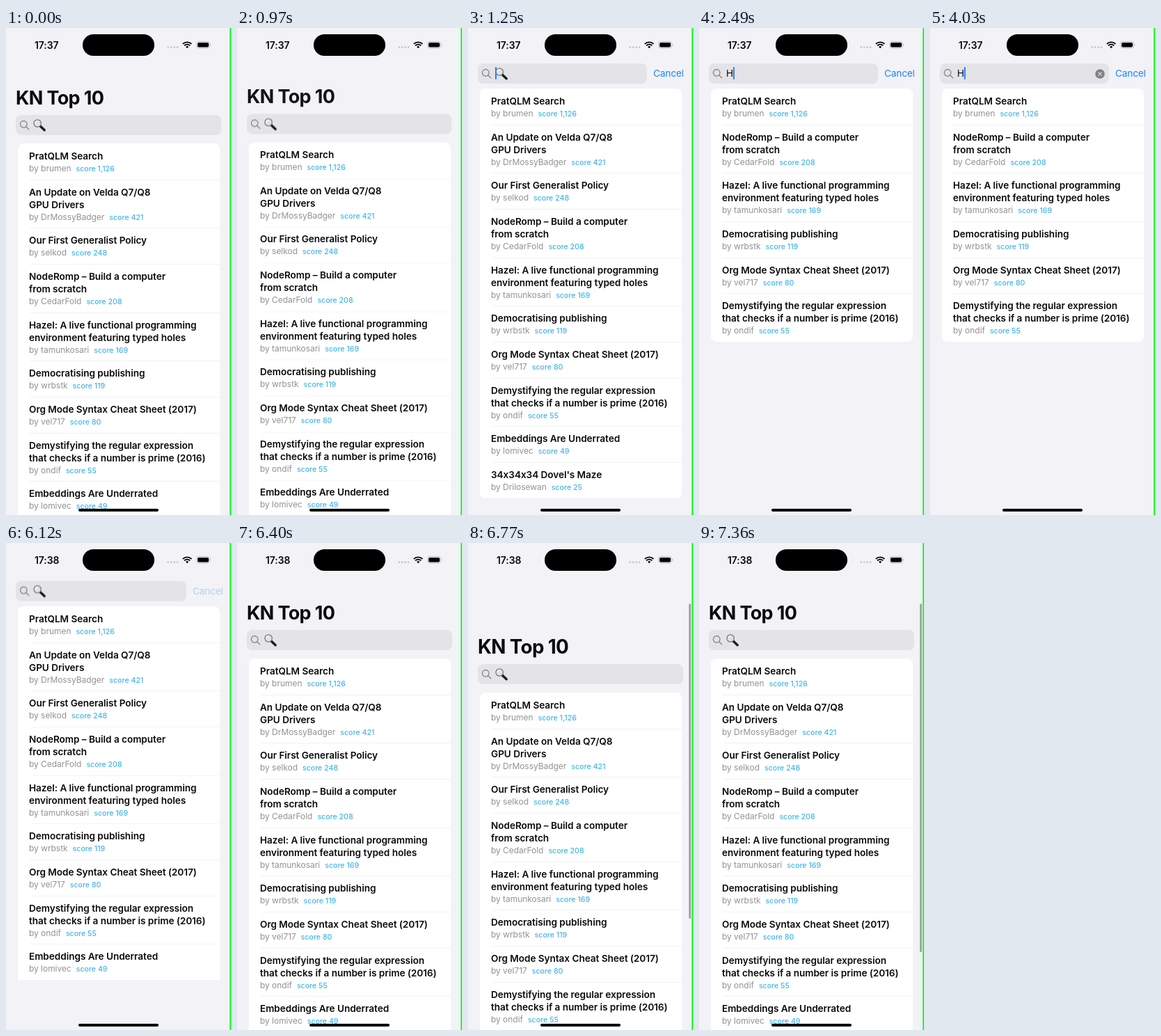
Write an HTML page that moves like this. It is 323 px wide and 700 px high and loops after 8 s.

```html
<!DOCTYPE html>
<html lang="en">
<head>
<meta charset="utf-8">
<title>Searchable list</title>
<style>
  html, body { margin: 0; width: 100%; height: 100%; overflow: hidden; }
  body {
    position: relative; background: #f2f2f7; color: #0b0b0c;
    font: 400 13.6px Inter, "Liberation Sans", sans-serif;
  }
  /* every animated part shares the same 8 s clock */
  .stage * { animation: 8s linear infinite; }
  .stage { position: absolute; left: 0; top: 0; width: 323px; height: 700px; overflow: hidden; }
  .stage svg, .abs { position: absolute; }

  .page { position: absolute; inset: 0; animation-name: pull; }

  h1 {
    position: absolute; left: 14px; top: 84px; margin: 0; white-space: nowrap;
    font-size: 27px; font-weight: 700; line-height: 34px; letter-spacing: -.65px;
    transform-origin: 0 50%;
  }
  .stage h1 { animation-name: title; }

  .search {
    position: absolute; left: 14px; top: 124.5px; width: 295px; height: 29px;
    border-radius: 8px; background: #e3e3e8; line-height: 29px;
  }
  .stage .search { animation-name: search; }
  .lens { left: 0; top: 0; }
  .hint { left: 24px; top: 4px; }
  .stage .hint { animation: hint 8s step-end infinite; }
  .input { position: absolute; left: 25px; top: 0; display: flex; align-items: center; height: 29px; }
  .stage .k1 { animation: k1 8s step-end infinite; }
  .stage .k2 { animation: k2 8s step-end infinite; }
  .caret { width: 1.8px; height: 18px; background: #2f80f7; border-radius: 1px; }
  .stage .caret { animation-name: caret; }
  .clear { right: 6px; top: 8px; }
  .stage .clear { animation: clear 8s step-end infinite; }
  .cancel {
    position: absolute; left: calc(100% + 9px); top: 0;
    color: #1a82ff; letter-spacing: -.15px;
  }
  .stage .cancel { animation-name: cancel; }

  .card {
    position: absolute; left: 16.5px; top: 166px; width: 290px; margin: 0; padding: 0;
    border-radius: 8px; background: #fff; overflow: hidden; list-style: none;
  }
  .stage .card { animation: card 8s linear infinite, crop 8s step-end infinite; }
  .card li { position: relative; overflow: hidden; }
  .card li + li::before {
    content: ""; position: absolute; left: 17px; right: 0; top: 0; height: 1px; background: #f2f2f4;
  }
  .stage .none { animation: hide1 8s step-end infinite; }
  .stage .one { animation: hide2 8s step-end infinite; }
  .card h2 {
    margin: 9px 0 0 16.5px; white-space: nowrap;
    font-size: 13.6px; font-weight: 600; line-height: 18.05px; letter-spacing: -.05px;
  }
  .card p {
    margin: 0 0 7.6px 16.5px; height: 17px; line-height: 17px; white-space: nowrap;
    font-size: 12px; letter-spacing: -.04px; color: #929296;
  }
  .card b { margin-left: 7px; font-size: 10.6px; font-weight: 500; letter-spacing: 0; color: #45b4ea; }

  .time {
    position: absolute; left: 41px; top: 14.5px; line-height: 20px;
    font-size: 14px; font-weight: 600; letter-spacing: -.1px;
  }
  .stage .t1 { animation: early 8s step-end infinite; }
  .stage .t2 { animation: late 8s step-end infinite; }
  .island { left: 110px; top: 9px; width: 102.5px; height: 31px; border-radius: 16px; background: #000; }
  .home { left: 104px; top: 691px; width: 114.5px; height: 4px; border-radius: 2px; background: #000; }
  .bar { left: 317px; top: 87px; width: 3px; height: 501px; border-radius: 2px; background: #a3a3a7; }
  .stage .bar { animation: bar 8s linear infinite, barOn 8s step-end infinite; }
  .edge { right: 0; top: 0; width: 2px; height: 100%; background: #1dff2a; }

  /* overscroll and spring back */
  @keyframes pull {
    0%, 82.6% { transform: none; animation-timing-function: ease-out; }
    84.6%, 85.8% { transform: translateY(49px); animation-timing-function: cubic-bezier(.35, 0, .3, 1); }
    92%, 100% { transform: none; }
  }
  @keyframes bar {
    0%, 82.6% { height: 501px; animation-timing-function: ease-out; }
    84.6%, 85.8% { height: 453px; animation-timing-function: cubic-bezier(.35, 0, .3, 1); }
    92%, 100% { height: 501px; }
  }
  @keyframes barOn { 0% { opacity: 0; } 82.875%, 100% { opacity: 1; } }

  /* search focus and dismissal */
  @keyframes title {
    0%, 11.75% { transform: none; opacity: 1; animation-timing-function: ease-in-out; }
    14.6% { transform: translateY(-62px); opacity: 0; }
    77% { transform: translateY(-50px); opacity: 0; animation-timing-function: ease-out; }
    80%, 82.6% { transform: none; opacity: 1; animation-timing-function: ease-out; }
    84.6%, 85.8% { transform: scale(1.03); animation-timing-function: cubic-bezier(.35, 0, .3, 1); }
    92%, 100% { transform: none; opacity: 1; }
  }
  @keyframes search {
    0%, 11.75% { transform: none; width: 295px; animation-timing-function: ease-in-out; }
    15.6%, 75.875% { transform: translateY(-74px); width: 243px; animation-timing-function: ease-in-out; }
    80%, 100% { transform: none; width: 295px; }
  }
  @keyframes card {
    0%, 11.75% { transform: none; animation-timing-function: ease-in-out; }
    15.6%, 75.875% { transform: translateY(-79px); animation-timing-function: ease-in-out; }
    80%, 100% { transform: none; }
  }
  @keyframes crop {
    0% { clip-path: none; }
    75.875%, 100% { clip-path: inset(0 0 51.65px 0); }
  }
  @keyframes cancel {
    0%, 12.5% { opacity: 0; }
    15.6%, 73.4% { opacity: 1; }
    73.5%, 76.8% { opacity: .3; }
    78.2%, 100% { opacity: 0; }
  }

  /* typing "He", then deleting it */
  @keyframes hint { 0% { opacity: 1; } 31.125% { opacity: 0; } 52.875%, 100% { opacity: 1; } }
  @keyframes k1 { 0% { font-size: 0; } 31.125% { font-size: 13.6px; } 52.875%, 100% { font-size: 0; } }
  @keyframes k2 { 0% { font-size: 0; } 32.75% { font-size: 13.6px; } 50.375%, 100% { font-size: 0; } }
  @keyframes clear { 0% { opacity: 0; } 32.75% { opacity: 1; } 53.75%, 100% { opacity: 0; } }
  @keyframes hide1 { 0% { max-height: 80px; } 31.125% { max-height: 0; } 52.875%, 100% { max-height: 80px; } }
  @keyframes hide2 { 0% { max-height: 80px; } 32.75% { max-height: 0; } 50.375%, 100% { max-height: 80px; } }
  @keyframes caret {
    0%, 14% { opacity: 0; }
    15.4%, 20.6% { opacity: 1; }
    21.5%, 24.3% { opacity: 0; }
    26.1%, 39.8% { opacity: 1; }
    40.75%, 44.4% { opacity: 0; }
    45.375%, 61.6% { opacity: 1; }
    63.375%, 66.7% { opacity: 0; }
    67.6%, 73.4% { opacity: 1; }
    73.5%, 100% { opacity: 0; }
  }

  @keyframes early { 0% { opacity: 1; } 62.5%, 100% { opacity: 0; } }
  @keyframes late { 0% { opacity: 0; } 62.5%, 100% { opacity: 1; } }
</style>
</head>
<body>
<div class="stage">
  <div class="page">
    <h1>KN Top 10</h1>

    <ul class="card">
      <li class="one"><h2>PratQLM Search</h2><p>by brumen<b>score 1,126</b></p></li>
      <li class="none"><h2>An Update on Velda Q7/Q8<br>GPU Drivers</h2><p>by DrMossyBadger<b>score 421</b></p></li>
      <li class="none"><h2>Our First Generalist Policy</h2><p>by selkod<b>score 248</b></p></li>
      <li class="one"><h2>NodeRomp – Build a computer<br>from scratch</h2><p>by CedarFold<b>score 208</b></p></li>
      <li class="one"><h2>Hazel: A live functional programming<br>environment featuring typed holes</h2><p>by tamunkosari<b>score 169</b></p></li>
      <li class="one"><h2>Democratising publishing</h2><p>by wrbstk<b>score 119</b></p></li>
      <li><h2>Org Mode Syntax Cheat Sheet (2017)</h2><p>by vel717<b>score 80</b></p></li>
      <li><h2>Demystifying the regular expression<br>that checks if a number is prime (2016)</h2><p>by ondif<b>score 55</b></p></li>
      <li class="none"><h2>Embeddings Are Underrated</h2><p>by lomivec<b>score 49</b></p></li>
      <li class="none"><h2>34x34x34 Dovel's Maze</h2><p>by Drilosewan<b>score 25</b></p></li>
    </ul>

    <div class="search">
      <svg class="lens" width="24" height="29" fill="none" stroke="#85858a" stroke-width="1.3" stroke-linecap="round">
        <circle cx="11.3" cy="13.3" r="4.8"/><path d="M15 17l3.8 3.8"/>
      </svg>
      <svg class="hint" width="22" height="22">
        <path d="M11.2 12l6 5.8" stroke="#1c1c1e" stroke-width="3.4" stroke-linecap="round"/>
        <circle cx="7.2" cy="8" r="5.2" fill="#dfe3e6" stroke="#77777b" stroke-width="1.3"/>
        <path d="M4.2 7.6a3.4 3.4 0 0 1 3-2.8" fill="none" stroke="#fff" stroke-width="1.2"/>
      </svg>
      <div class="input"><span class="k1">H</span><span class="k2">e</span><i class="caret"></i></div>
      <svg class="clear" width="14" height="14">
        <circle cx="7" cy="7" r="6.8" fill="#808085"/>
        <path d="M4.8 4.8l4.4 4.4m0-4.4l-4.4 4.4" stroke="#e3e3e8" stroke-width="1.2" stroke-linecap="round"/>
      </svg>
      <span class="cancel">Cancel</span>
    </div>
  </div>

  <div class="time t1">17:37</div>
  <div class="time t2">17:38</div>
  <div class="abs island"></div>
  <svg style="left:228px;top:14px" width="70" height="20">
    <path d="M4.8 13.6h15" stroke="#c3c3c8" stroke-width="2.7" stroke-linecap="round" stroke-dasharray="0 4.4"/>
    <g fill="none" stroke="#000" stroke-width="1.9">
      <path d="M25.8 8.9a9 9 0 0 1 12.6 0M28 11.3a5.9 5.9 0 0 1 8.2 0"/>
    </g>
    <path d="M32.1 15.3l-2.1-2.2a3 3 0 0 1 4.2 0z"/>
    <rect x="45.7" y="5.6" width="18.6" height="9.2" rx="3" fill="none" stroke="#b4b4b8" stroke-width=".9"/>
    <rect x="47" y="6.9" width="16" height="6.6" rx="1.9"/>
    <path d="M65.5 8.6q1.7 1.6 0 3.2z" fill="#a5a5a9"/>
  </svg>
  <div class="abs bar"></div>
  <div class="abs home"></div>
  <div class="abs edge"></div>
</div>
</body>
</html>
```
